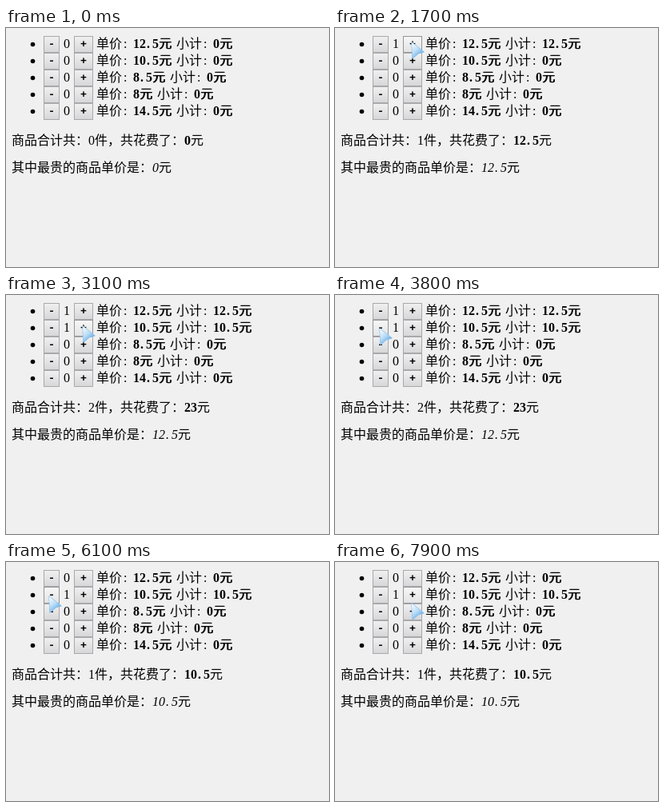
These frames come from a looping animation (404 by 299 pixels, 8000 ms). An HTML page with a canvas:

```html
<!DOCTYPE html>
<html lang="zh-CN">
<head>
<meta charset="utf-8">
<style>
  html, body { margin: 0; width: 100%; height: 100%; overflow: hidden; background: #f0f0f0; }
  canvas { display: block; }
</style>
</head>
<body>
<canvas id="stage" width="404" height="299"></canvas>
<script>
const ctx = document.getElementById('stage').getContext('2d');
const LOOP = 8000, STEP = 100, ROW = 21, TOP = 10;
const MINUS = { label: '-', x: 47, w: 20, tip: 53, change: -1 };
const PLUS = { label: '+', x: 85, w: 24, tip: 95, change: 1 };
const prices = [12.5, 10.5, 8.5, 8, 14.5];

// The pointer glides to a button; row is fractional, counted from the top of the list.
const moves = [
  { from: 300, to: 800, button: PLUS, row: .35 },
  { from: 2100, to: 2700, button: PLUS, row: 1.35 },
  { from: 3300, to: 4100, button: MINUS, row: 1.5 },
  { from: 4500, to: 4800, button: MINUS, row: .5 },
  { from: 5300, to: 5400, button: MINUS, row: 1.2 },
  { from: 5700, to: 6100, button: MINUS, row: 1.5 },
  { from: 7000, to: 7500, button: PLUS, row: 1.95 }
];

// Each click hits the button the pointer rests on.
const clicks = [1700, 3100, 5200, 7000, 7800].map(at => {
  const { button, row } = moves.filter(m => m.to < at).pop();
  return { at, row: Math.floor(row), change: button.change };
});

function pointerAt(t) {
  let x = 296, y = 191;
  for (const { from, to, button, row } of moves) {
    const k = Math.min(1, Math.max(0, (t - from) / (to - from)));
    const eased = 1 - (1 - k) ** 3;
    x += (button.tip - x) * eased;
    y += (TOP + row * ROW - y) * eased;
  }
  return { x: Math.round(x), y: Math.round(y) };
}

// Half-width characters take 8px cells, full-width ones 16px; returns the end x.
function write(text, x, y, style = '') {
  ctx.fillStyle = '#000';
  ctx.textAlign = 'left';
  for (const ch of String(text)) {
    const wide = ch > '\u2fff';
    ctx.font = wide
      ? '300 16px "Noto Sans CJK SC", "Noto Sans CJK", sans-serif'
      : `${style} 16px "Liberation Serif", serif`;
    ctx.fillText(ch, x + (ch === ':' ? 2 : ch === '.' ? 1 : 0), y);
    if (wide && style === 'bold') ctx.fillText(ch, x + .7, y);
    x += wide ? 16 : 8;
  }
  return x;
}

function drawButton({ label, x, w }, y, pointer) {
  const hover = pointer.x >= x && pointer.x < x + w && pointer.y >= y && pointer.y < y + ROW;
  const shade = ctx.createLinearGradient(0, y, 0, y + ROW);
  shade.addColorStop(0, hover ? '#f8f8f8' : '#f1f1f2');
  shade.addColorStop(1, hover ? '#e2e2e4' : '#d6d6d8');
  ctx.fillStyle = shade;
  ctx.fillRect(x, y, w, ROW);
  ctx.strokeStyle = hover ? '#959598' : '#a9a9ac';
  ctx.lineWidth = 1;
  ctx.strokeRect(x + .5, y + .5, w - 1, ROW - 1);
  ctx.fillStyle = '#000';
  ctx.font = 'bold 13.333px "Liberation Mono", monospace';
  ctx.textAlign = 'center';
  ctx.fillText(label, x + w / 2, y + 14);
}

function drawPointer({ x, y }) {
  ctx.save();
  ctx.translate(x, y);
  const ice = ctx.createLinearGradient(2, 5, 12, 17);
  ice.addColorStop(0, '#eaf5fe');
  ice.addColorStop(.5, '#b9dcf6');
  ice.addColorStop(1, '#68aee6');
  ctx.fillStyle = ice;
  ctx.strokeStyle = '#8cc0e8';
  ctx.lineWidth = 1.3;
  ctx.lineJoin = 'round';
  ctx.stroke(new Path2D('M1 1L16 13L9 15L2 21Z'));
  ctx.fill(new Path2D('M1 1L16 13L9 15L2 21Z'));
  ctx.restore();
}

function draw(t) {
  const pointer = pointerAt(t);
  const counts = prices.map((_, row) => clicks.reduce(
    (n, click) => click.row === row && t >= click.at ? n + click.change : n, 0));

  ctx.fillStyle = '#f0f0f0';
  ctx.fillRect(0, 0, 404, 299);

  prices.forEach((price, row) => {
    const y = TOP + row * ROW, base = y + 15;
    ctx.fillStyle = '#000';
    ctx.beginPath();
    ctx.arc(33.5, y + 10.5, 2.8, 0, 7);
    ctx.fill();
    drawButton(MINUS, y, pointer);
    drawButton(PLUS, y, pointer);
    write(counts[row], 72, base);
    write('单价:', 113, base);
    const end = write(price + '元', 159, base, 'bold');
    write('小计:', end + 6, base);
    write(price * counts[row] + '元', end + 52, base, 'bold');
  });

  const amount = counts.reduce((sum, n) => sum + n, 0);
  const total = counts.reduce((sum, n, i) => sum + n * prices[i], 0);
  const dearest = Math.max(...prices.map((price, i) => counts[i] ? price : 0));

  let x = write(`商品合计共：${amount}件，共花费了：`, 7, 146);
  x = write(total, x, 146, 'bold');
  write('元', x, 146);
  x = write('其中最贵的商品单价是：', 7, 180);
  x = write(dearest, x, 180, 'italic');
  write('元', x, 180);

  if (t >= STEP) drawPointer(pointer);
}

const start = performance.now();
function tick() {
  const t = (performance.now() - start) % LOOP;
  draw(Math.floor(t / STEP) * STEP);
  requestAnimationFrame(tick);
}
tick();
</script>
</body>
</html>
```
